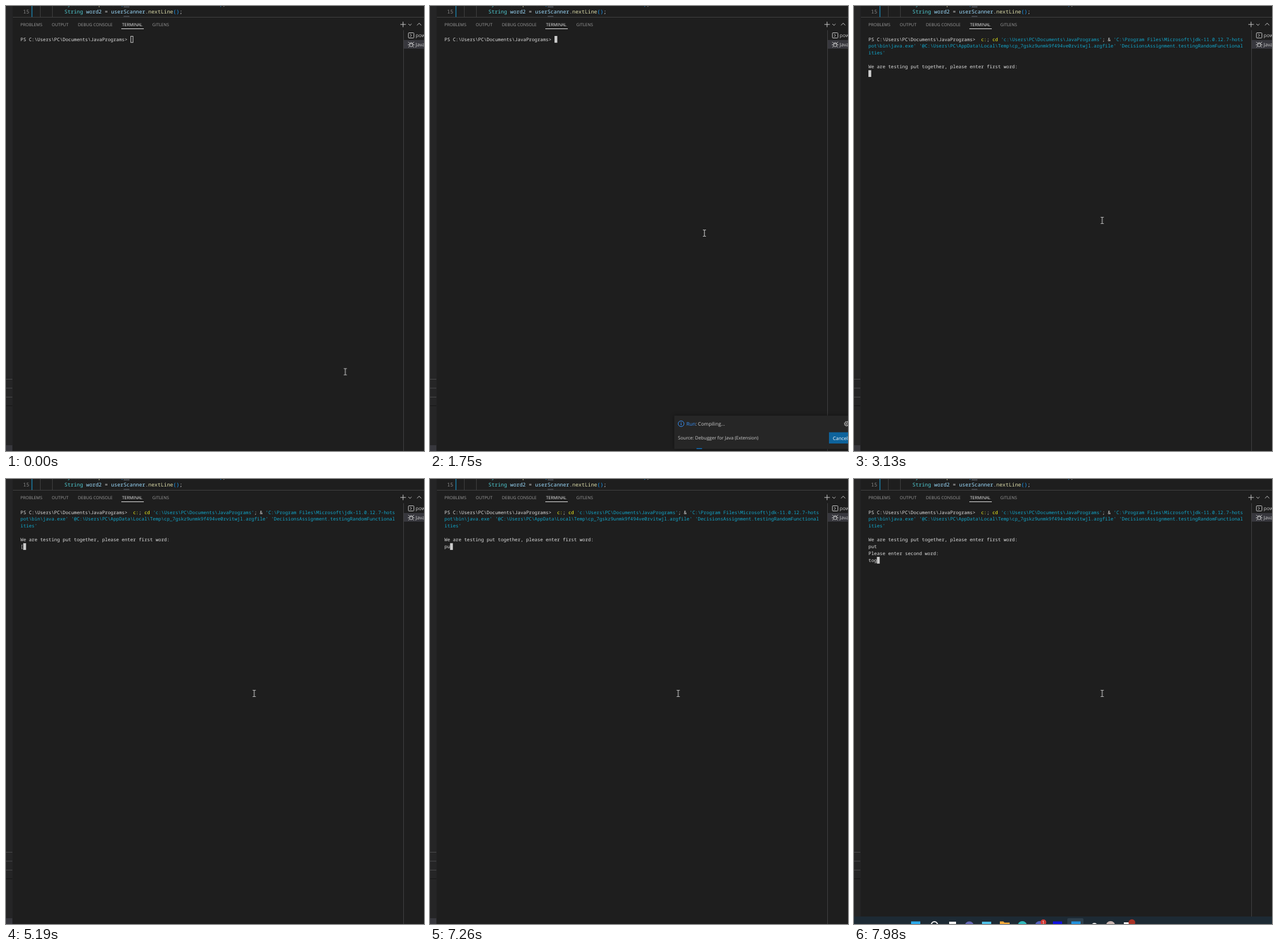
Write an HTML page that moves like this. It is 725 by 772 pixels and loops after 8000 ms.

```html
<!DOCTYPE html>
<html lang="en">
<head>
<meta charset="utf-8">
<title>Terminal session</title>
<style>
html, body { margin: 0; width: 100%; height: 100%; overflow: hidden; background: #1e1e1e; }
svg { display: block; width: 725px; height: 772px; }
text { white-space: pre; text-rendering: geometricPrecision; }
.term, .code { font-family: "Noto Sans Mono", monospace; }
.term { font-size: 8.158px; fill: #dedede; }
.code { font-size: 8.99px; fill: #d4d4d4; }
.ui { font-family: "Open Sans", "Noto Sans", sans-serif; font-size: 8.5px; fill: #ccc; }
.tabs { font-size: 7.35px; fill: #9b9b9b; }
.tabs .on { fill: #e7e7e7; }
.str { fill: #11a8cd; }
.cmd { fill: #f5f51e; }
.type { fill: #4ec9d0; }
.var { fill: #9cdcfe; }
.fn { fill: #dcdcaa; }
.br { fill: #179fff; }
.line { fill: none; stroke: #ccc; stroke-width: 1; }
.hide { display: none; }

#pointer { animation: point 8s step-end infinite; }
#toast { animation: toast 8s linear infinite; }
#progress { transform-box: fill-box; transform-origin: center; animation: progress 8s linear infinite; }
#taskbar { animation: taskbar 8s step-end infinite; }

@keyframes point {
  0% { transform: translate(588.5px, 634.5px); }
  .875% { transform: translate(570.5px, 592.5px); }
  1.625% { transform: translate(526.5px, 492.5px); }
  2.5% { transform: translate(490.5px, 420.5px); }
  3.375% { transform: translate(476px, 394px); }
  25.375% { transform: translate(472px, 394px); }
  26.25% { transform: translate(454px, 386px); }
  27.125% { transform: translate(434px, 375px); }
  28% { transform: translate(424px, 370px); }
  36.625% { transform: translate(426px, 371px); }
  37.5% { transform: translate(429px, 372px); }
  39.125%, 100% { transform: translate(430.5px, 372px); }
}
@keyframes toast {
  0% { transform: translateY(58px); opacity: 0; }
  15.1875% { transform: translateY(58px); opacity: 0; animation-timing-function: ease-out; }
  18.9375%, 30% { transform: none; opacity: 1; }
  30.001%, 100% { transform: none; opacity: 0; }
}
@keyframes progress {
  0%, 15.375% { transform: none; }
  40.375%, 100% { transform: translateX(155px) scaleX(3); }
}
@keyframes taskbar {
  0% { visibility: hidden; }
  99.75%, 100% { visibility: visible; }
}
</style>
</head>
<body>
<svg viewBox="0 0 725 772">
  <defs>
    <filter id="shadow" x="-10%" y="-30%" width="120%" height="160%">
      <feDropShadow dx="0" dy="0" stdDeviation="3" flood-color="#000" flood-opacity=".45"/>
    </filter>
  </defs>
  <rect width="725" height="772" fill="#1e1e1e"/>

  <g id="sidebar">
    <rect width="11.5" height="772" fill="#252526"/>
    <path d="M0 647.5H11M0 663H11M0 678.5H11" stroke="#4b4b4c"/>
    <path d="M0 693.5H11" stroke="#161616"/>
    <rect y="762" width="11" height="10" fill="#37373d"/>
  </g>

  <g id="editor" class="code">
    <path d="M59.5 0V19M80.5 0V19" stroke="#404040"/>
    <rect x="44" width="2" height="19" fill="#1b6583"/>
    <path d="M204 0h10v3h-10zM204 17h10v2h-10z" fill="#3d4045"/>
    <text x="101.3" y="0"><tspan class="type">System</tspan>.<tspan class="var">out</tspan>.<tspan class="fn">println</tspan><tspan class="br">(</tspan></text>
    <text x="370" y="0"><tspan class="br">)</tspan>;</text>
    <text x="29.5" y="13.3" fill="#858585">15</text>
    <text x="101.3" y="13.3"><tspan class="type">String</tspan> <tspan class="var">word2</tspan> = <tspan class="var">userScanner</tspan>.<tspan class="fn">nextLine</tspan><tspan class="br">()</tspan>;</text>
  </g>

  <g id="panel">
    <path d="M12 19.5H725M689.5 42V772" stroke="#414142"/>
    <g class="ui tabs">
      <text x="25" y="34.7">PROBLEMS</text>
      <text x="79.3" y="34.7">OUTPUT</text>
      <text x="124.7" y="34.7">DEBUG CONSOLE</text>
      <text x="201.3" y="34.7" class="on">TERMINAL</text>
      <text x="253.8" y="34.7">GITLENS</text>
    </g>
    <path d="M200 39.5H239" stroke="#e7e7e7"/>
    <path class="line" d="M684 32H693.5M688.7 27.3V36.7M698 31l2.7 2.7 2.7-2.7M713 33.5l3.6-3.8 3.6 3.8"/>
    <rect x="690" y="59" width="35" height="15" fill="#37373d"/>
    <g class="line">
      <rect x="698" y="46.5" width="9.5" height="9" rx="1"/>
      <path d="M701 48.7l2.5 2.3-2.5 2.3"/>
      <ellipse cx="702.7" cy="67" rx="2.8" ry="3.7"/>
      <path d="M700 65.5h5.4M699.9 64.5l-2.2-2.2M705.5 64.5l2.2-2.2M699.8 67.3h-2.8M705.6 67.3h2.8M700.3 69.5l-2.4 2.2M705.1 69.5l2.4 2.2"/>
    </g>
    <g class="ui">
      <text x="710.5" y="54">powershell</text>
      <text x="710.5" y="69.7">Java Process</text>
    </g>
  </g>

  <g id="terminal" class="term">
    <text data-row="0">PS C:\Users\PC\Documents\JavaPrograms&gt;<tspan data-from="1">  <tspan class="cmd">c:</tspan>; <tspan class="cmd">cd</tspan> <tspan class="str">'c:\Users\PC\Documents\JavaPrograms'</tspan>; &amp; <tspan class="str">'C:\Program Files\Microsoft\jdk-11.0.12.7-hots</tspan></tspan></text>
    <text data-row="1" data-from="1" class="str">pot\bin\java.exe' '@C:\Users\PC\AppData\Local\Temp\cp_7gskz9unmk9f494ve0rvitwjl.argfile' 'DecisionsAssignment.testingRandomFunctional</text>
    <text data-row="2" data-from="1" class="str">ities'</text>
    <text data-row="4" data-from="2">We are testing put together, please enter first word:</text>
    <text data-row="5" data-from="2" id="first"></text>
    <text data-row="6" data-from="3">Please enter second word:</text>
    <text data-row="7" data-from="3" id="second"></text>
    <rect id="caret" width="4.9" height="11.7"/>
  </g>

  <g id="toast">
    <rect x="423.5" y="710.5" width="310" height="58" fill="#252526" filter="url(#shadow)"/>
    <g fill="none" stroke="#3794ff">
      <circle cx="435.5" cy="724.7" r="5"/>
      <path d="M435.5 723.7v3.8M435.5 721.5v1.2"/>
    </g>
    <g class="ui">
      <text x="444.7" y="727.9"><tspan fill="#3794ff">Run</tspan>: Compiling...</text>
      <text x="430" y="752.4" font-size="8" style="font-size:8px">Source: Debugger for Java (Extension)</text>
    </g>
    <g class="line">
      <circle cx="722.7" cy="724.8" r="3.2"/>
      <circle cx="722.7" cy="724.8" r="4.2" stroke-dasharray="1.6 1.7"/>
      <circle cx="722.7" cy="724.8" r="1"/>
    </g>
    <rect x="692" y="739.5" width="41" height="19.5" fill="#0e639c"/>
    <text class="ui" x="698.8" y="752.5" style="fill:#fff;font-size:8.3px">Cancel</text>
    <rect id="progress" x="423.5" y="767" width="6.2" height="1.5" fill="#0e70c0"/>
  </g>

  <g id="taskbar">
    <rect y="759" width="725" height="13" fill="#1d2a34"/>
    <rect x="99" y="767.5" width="16" height="16" fill="#2aa9ea"/>
    <circle cx="139.5" cy="773.5" r="5.5" fill="none" stroke="#f0f0f0" stroke-width="2"/>
    <rect x="165" y="768" width="12" height="12" fill="#f2f2f2"/>
    <circle cx="200" cy="775.5" r="8" fill="#6467b4"/>
    <rect x="222" y="768" width="16" height="16" fill="#4fbfe6"/>
    <path d="M253 784V767.5h6l2 2h9V784z" fill="#f0a83a"/>
    <circle cx="292" cy="775" r="8" fill="#2fb9bd"/>
    <circle cx="322" cy="775" r="8" fill="#5660bd"/>
    <circle cx="328.5" cy="769" r="5" fill="#d13a35"/>
    <text class="ui" x="328.5" y="771.8" text-anchor="middle" style="fill:#fff;font-size:7.5px">1</text>
    <rect x="345" y="767.5" width="16" height="16" fill="#1010e0"/>
    <rect x="370" y="762" width="28" height="20" rx="2" fill="#2e3f4c"/>
    <rect x="377" y="767.5" width="16" height="16" fill="#2190dc"/>
    <circle cx="417" cy="775" r="5" fill="#e4e4e4"/>
    <circle cx="445" cy="775" r="8" fill="#c9b5b1"/>
    <rect x="468" y="769" width="14" height="14" fill="#f0f0f0"/>
    <circle cx="482" cy="769.5" r="5.8" fill="#a93226"/>
  </g>

  <g id="pointer">
    <path d="M-2.5 -5.5H-.7L0 -5 .7 -5.5H2.5M0 -5V5M-2.5 5.5H-.7L0 5 .7 5.5H2.5" fill="none" stroke="#e2e2e2"/>
  </g>
</svg>
<script>
const LOOP = 8000, LEFT = 25, CELL = 4.895, ROW = 11.87;
const caretRows = [0, 3, 5, 7];

// [ms, stage, typed text]; stages: prompt, command, first word, second word
const steps = [
  [0, 0, ''], [2330, 1, ''], [2730, 2, ''],
  [4390, 2, '['], [4720, 2, ''], [4920, 2, '['], [5190, 2, '[i'],
  [5460, 2, '['], [5590, 2, ''], [5720, 2, 'pi'], [6060, 2, 'p'],
  [6330, 2, 'pt'], [6530, 2, 'ptu'], [6800, 2, 'pt'], [7000, 2, 'p'],
  [7210, 2, 'pu'], [7260, 2, 'put'],
  [7400, 3, ''], [7600, 3, 't'], [7730, 3, 'to'], [7930, 3, 'tog']
];

const $ = id => document.getElementById(id);
const caret = $('caret'), first = $('first'), second = $('second');
const staged = [...document.querySelectorAll('[data-from]')];
const clock = $('pointer').getAnimations()[0];

for (const el of document.querySelectorAll('[data-row]')) {
  el.setAttribute('x', LEFT);
  el.setAttribute('y', 60.6 + el.dataset.row * ROW);
}

function setCaret(row, col, focused) {
  const inset = focused ? 0 : .5;
  const box = {
    x: LEFT + col * CELL + inset, y: 52 + row * ROW + inset,
    width: 4.9 - 2 * inset, height: 11.7 - 2 * inset,
    fill: focused ? '#ccc' : 'none', stroke: focused ? 'none' : '#ccc'
  };
  for (const key in box) caret.setAttribute(key, box[key]);
}

function draw() {
  const now = clock ? clock.currentTime : performance.now();
  const t = (now || 0) % LOOP;
  const [, stage, typed] = steps.findLast(step => step[0] <= t) || steps[0];
  for (const el of staged) el.classList.toggle('hide', stage < el.dataset.from);
  first.textContent = stage === 3 ? 'put' : typed;
  second.textContent = typed;
  setCaret(caretRows[stage], stage ? typed.length : 39, t >= 70);
  requestAnimationFrame(draw);
}
draw();
</script>
</body>
</html>
```
